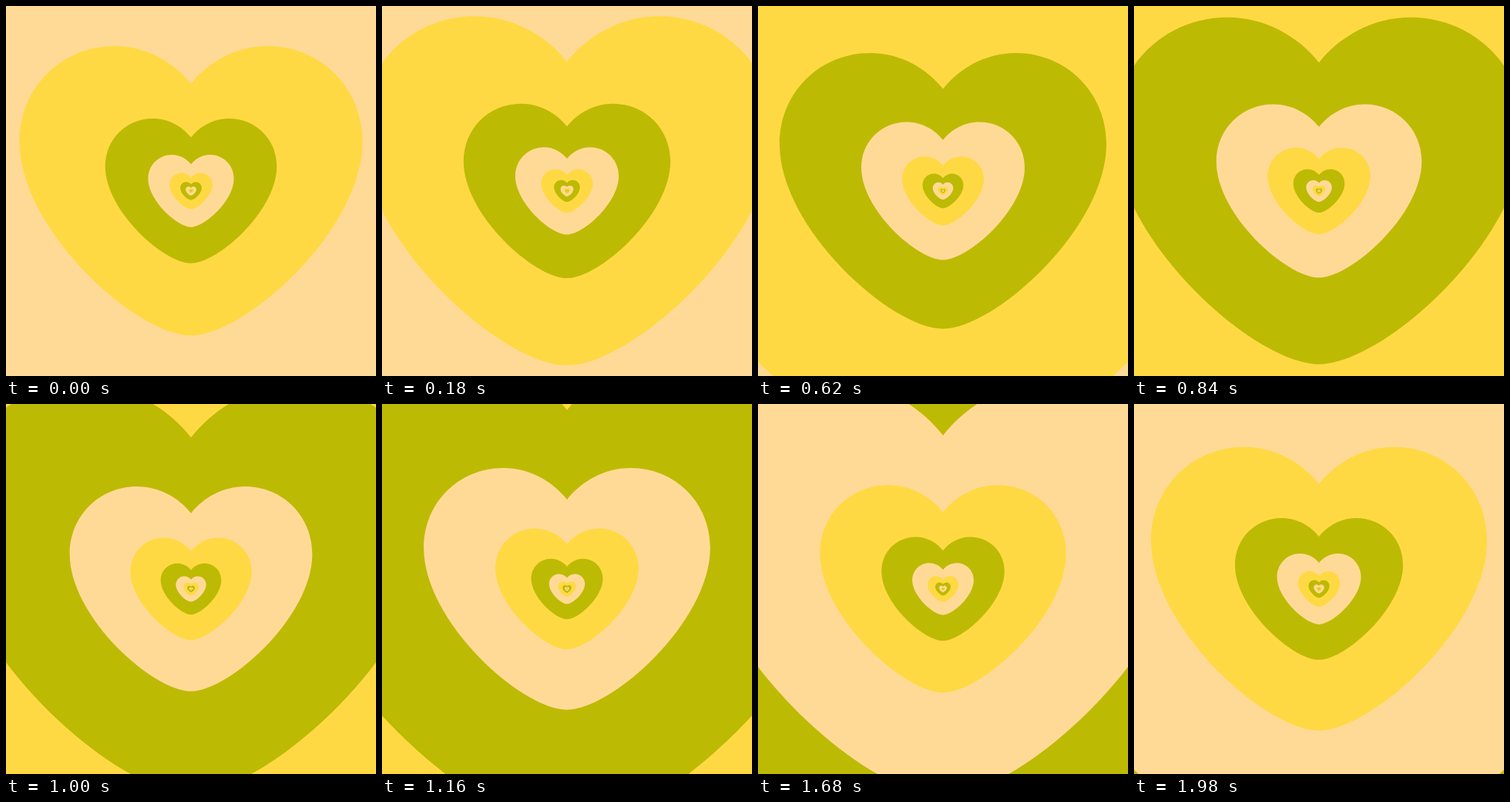
An HTML page with a canvas for the animation above (2000 ms loop, 480x480 px).

```html
<!DOCTYPE html>
<html lang="en">
<head>
<meta charset="utf-8">
<title>Endless hearts</title>
<style>
  html, body { margin: 0; width: 100%; height: 100%; overflow: hidden; background: #ffda96; }
  canvas { display: block; }
</style>
</head>
<body>
<canvas id="stage" width="480" height="480"></canvas>
<script>
const ctx = document.getElementById('stage').getContext('2d');
const LOOP = 2000, STEP = 20;
const colors = ['#ffd943', '#bdba04', '#ffda96'];

// Heart centred on the origin: left half, then right half back to the notch
const heart = new Path2D(`M0-139
  C-22-167-58-188-99-188 C-168-188-222.5-134-222.5-64 C-222.5 51-70 187.6 0 187.6
  C70 187.6 222.5 51 222.5-64 C222.5-134 168-188 99-188 C58-188 22-167 0-139Z`);

function draw(ms) {
  // Every heart doubles in size three times per loop, once per colour
  const zoom = 3 * ms / LOOP;
  ctx.setTransform(1, 0, 0, 1, 0, 0);
  ctx.fillStyle = colors[2];
  ctx.fillRect(0, 0, 480, 480);
  for (let i = -1; i < 12; i++) {
    const scale = 2 ** (zoom - i);
    ctx.setTransform(scale, 0, 0, scale, 240, 240);
    ctx.fillStyle = colors[(i + 3) % 3];
    ctx.fill(heart);
  }
}

const start = performance.now();
function tick() {
  const ms = (performance.now() - start) % LOOP;
  draw(Math.floor(ms / STEP) * STEP);
  requestAnimationFrame(tick);
}
tick();
</script>
</body>
</html>
```
